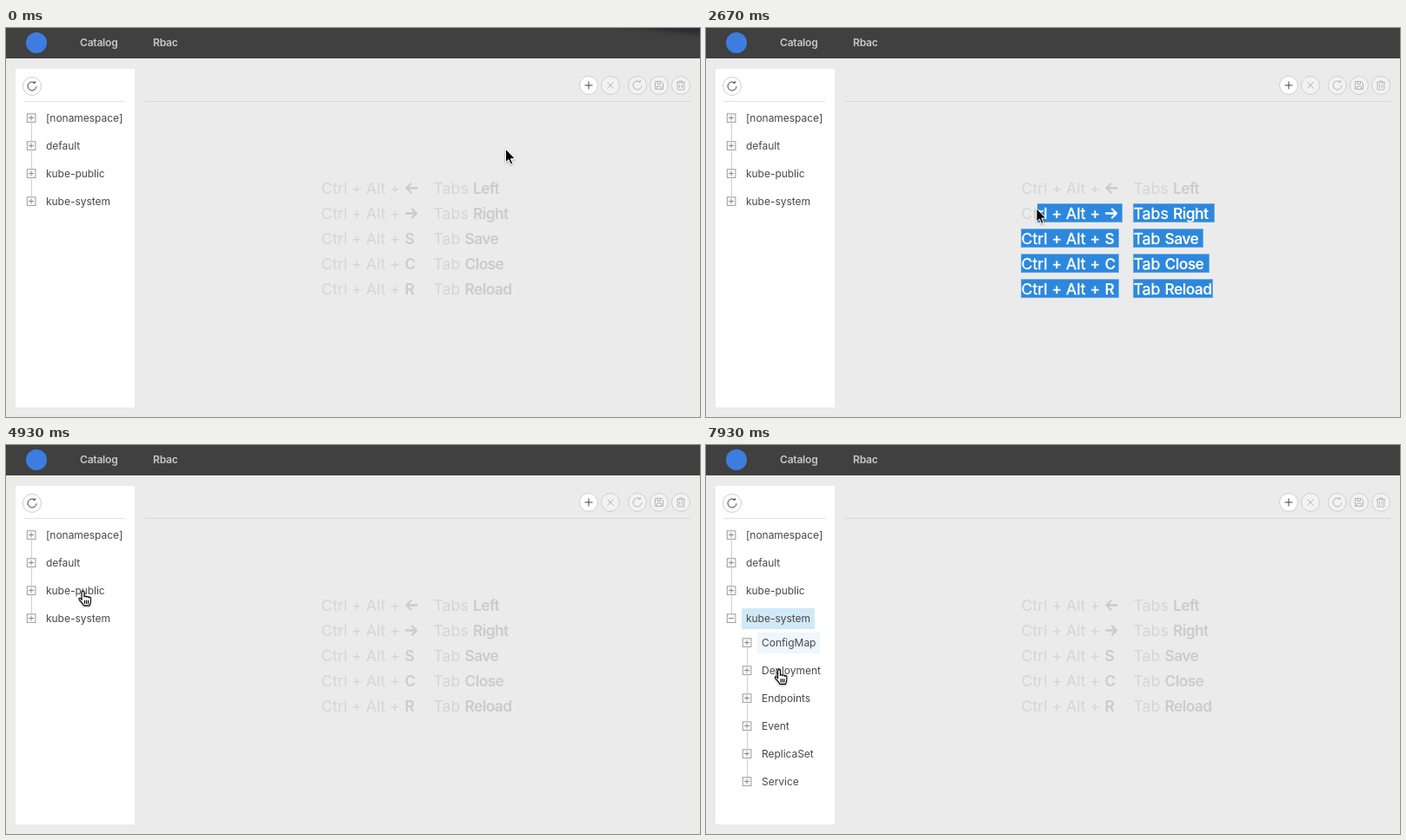
Recreate the animation shown at these times as an HTML page. Size 798 by 448 pixels, loop 8000 ms.

```html
<!DOCTYPE html>
<html lang="en">
<head>
<meta charset="utf-8">
<title>Cluster browser</title>
<style>
html, body { margin: 0; width: 100%; height: 100%; overflow: hidden; background: #ebebeb; }
svg { display: block; width: 100vw; height: 100vh; }
text { font: 12px Inter, sans-serif; font-optical-sizing: none; letter-spacing: -.2px; white-space: pre; }
.nav text { font-weight: 600; fill: #c9c9c9; }
.tree text { fill: #484848; letter-spacing: -.03px; }
.keys text { font-size: 17.7px; letter-spacing: 0; fill: #d5d5d5; }
.keys .b { font-size: 17.3px; font-weight: 600; letter-spacing: -.55px; fill: #cbcbcb; }
.keys path { fill: none; stroke: #cbcbcb; stroke-width: 2.3; stroke-linecap: round; stroke-linejoin: round; }
.sel text, .sel .b { fill: #fff; }
.sel text:not(.b) { stroke: #fff; stroke-width: .35; }
.sel path { stroke: #fff; }
.sel rect { fill: #2d88dd; stroke: #6aaeea; }
.icon { fill: none; }
.box { fill: #fff; stroke: #999; }
.line { stroke: #cfcfcf; }
.cur path { stroke-linejoin: round; stroke-linecap: round; }
.hand path { fill: #fff; stroke: #000; stroke-width: 1.1; }
</style>
</head>
<body>
<svg id="stage" viewBox="0 0 798 448" preserveAspectRatio="none">
  <defs>
    <clipPath id="selClip"><rect id="selRow" height="29" width="798"/><rect id="selRest" width="798" height="200"/></clipPath>
    <clipPath id="kidClip"><rect id="kidBox" x="11" y="212" width="137"/></clipPath>
    <filter id="soft"><feGaussianBlur stdDeviation="2.5"/></filter>
    <filter id="drop" x="-50%" y="-50%" width="200%" height="200%">
      <feDropShadow dx="0" dy="1" stdDeviation="0.8" flood-opacity=".35"/>
    </filter>
  </defs>
  <rect width="798" height="448" fill="#ebebeb"/>
  <rect width="798" height="35" fill="#404040"/>
  <path id="shade" d="M704 -4H802V8L760 4Z" fill="#2c2c30" filter="url(#soft)"/>
  <circle cx="35" cy="17" r="12" fill="#3e7de0"/>
  <g class="nav"><text x="85" y="21">Catalog</text><text x="169" y="21">Rbac</text></g>
  <rect x="11" y="47" width="137" height="390" fill="#fff"/>
  <path d="M20 84.5H137" stroke="#e2e2e2"/>
  <path d="M160 84.5H787" stroke="#d6d6d6"/>
  <g id="buttons"></g>
  <g id="tree" class="tree"></g>
  <g id="keys" class="keys"></g>
  <g id="sel" class="keys sel" clip-path="url(#selClip)"></g>
  <g id="cursor" class="cur" filter="url(#drop)">
    <path id="arrow" d="M0 0V15.2L3.5 12 5.8 17.4 8.2 16.4 5.9 11.1H10.6Z" stroke="#fff"/>
    <g id="grab" class="hand">
      <path transform="translate(-7.5 -8.5)" d="M3.6 9.6L2.6 4.4a1.2 1.2 0 0 1 2.3-.5L5.8 7 5.7 2.2a1.2 1.2 0 0 1 2.5 0L8.4 6.8 9.3 2.4a1.2 1.2 0 0 1 2.4.4L11.2 7.4 12.6 4.6a1.2 1.2 0 0 1 2.2.8Q13.8 9 13.6 12.5L12.4 16.6H5.8Q4.6 13.8 .9 10.6 .3 9.2 1.6 8.8T3.6 9.6Z"/>
    </g>
    <g id="point" class="hand" transform="translate(-5.4 0)">
      <path d="M4 11V2a1.4 1.4 0 0 1 2.8 0V7.4a1.4 1.3 0 0 1 2.7.4a1.3 1.2 0 0 1 2.5.6a1.2 1.2 0 0 1 2.2 1V12.5Q14 15 12.8 17.4H6.4Q5.4 15 1.2 10.8 .3 9.4 1.4 8.8T4 11Z"/>
      <path d="M7.4 11.5V15M9.4 11.5V15M11.4 11.5V15" stroke-width=".8"/>
    </g>
  </g>
</svg>
<script>
const LOOP = 8000;
const $ = id => document.getElementById(id);
const show = (id, on) => $(id).style.display = on ? '' : 'none';
const clamp = v => Math.max(0, Math.min(1, v));
const smooth = v => v * v * (3 - 2 * v);
const ramp = (t, from, to) => smooth(clamp((t - from) / (to - from)));

// Toolbar buttons
const icons = {
  plus: 'M-4.5 0H4.5M0 -4.5V4.5',
  close: 'M-3.5 -3.5L3.5 3.5M3.5 -3.5L-3.5 3.5',
  reload: 'M5 .3A5 5 0 1 1 3 -4M3.8 -5.6L3.3 -3.6L1.1 -3.9',
  save: 'M-4.5 -4.5H2.5L4.5 -2.5V4.5H-4.5ZM-2 -4.5V-1.5H1.5V-4.5M-2.5 4.5V1.2H2.5V4.5',
  trash: 'M-5 -3.2H5M-1.8 -3.2V-5H1.8V-3.2M-3.8 -3.2V5H3.8V-3.2M-1.4 -1V3M1.4 -1V3'
};
const button = (x, y, name, ink, fill) =>
  `<g transform="translate(${x} ${y})"><circle r="10.5" fill="${fill}" stroke="#cfcfcf"/>
   <path class="icon" d="${icons[name]}" stroke="${ink}"/></g>`;
$('buttons').innerHTML = button(30, 67, 'reload', '#444', '#fff') +
  button(670, 66, 'plus', '#444', '#fff') +
  [[695, 'close'], [726, 'reload'], [751, 'save'], [776, 'trash']]
    .map(([x, name]) => button(x, 66, name, '#b4b4b4', '#f2f2f2')).join('');

// Namespace tree
const node = (x, y, label, id = '') =>
  `<rect class="box" x="${x - 4.7}" y="${y - 4.7}" width="9.6" height="9.6"/>
   <path d="M${x - 3} ${y}H${x + 3}" stroke="#888"/>
   <path ${id} d="M${x} ${y - 3}V${y + 3}" stroke="#888"/>
   <text x="${x + 17}" y="${y + 4}">${label}</text>`;
const branch = (x, y, labels, lastId) => labels.map((label, i) => {
  const cy = y + 32 * i, last = i === labels.length - 1;
  return node(x, cy, label, last ? lastId : '') +
    (last ? '' : `<path class="line" d="M${x + .5} ${cy + 6}V${cy + 27}"/>`);
}).join('');
$('tree').innerHTML =
  '<rect id="pick" x="41" y="188" width="84" height="24" rx="1"/>' +
  branch(29, 103.5, ['[nonamespace]', 'default', 'kube-public', 'kube-system'], 'id="stem"') +
  '<g id="kids" clip-path="url(#kidClip)"><rect id="hover" x="59" y="216" width="72" height="24" rx="1" fill="#ecf6fd"/>' +
  branch(47, 227.5, ['ConfigMap', 'Deployment', 'Endpoints', 'Event', 'ReplicaSet', 'Service']) + '</g>';

// Shortcut table: key, word, action, action x, right edges of both cells
const rows = [
  ['left', 'Tabs', 'Left', 537, 478.5, 573.5],
  ['right', 'Tabs', 'Right', 537, 478.5, 584.5],
  ['S', 'Tab', 'Save', 527.5, 474.5, 571.5],
  ['C', 'Tab', 'Close', 527.5, 474.5, 578.5],
  ['R', 'Tab', 'Reload', 527.5, 474.5, 582.5]
];
const arrows = { left: 'M472.5 0H460.5M465.5 -5L460.5 0L465.5 5', right: 'M460 0H472M467 -5L472 0L467 5' };
const block = (x, end, y) => `<rect x="${x}" y="${y}" width="${end - x}" height="21"/>`;
const shortcuts = selected => rows.map(([key, word, act, ax, e1, e2], i) => {
  const y = 184.5 + 29 * i, base = y + 6.2, top = y - 11;
  return (selected ? block(362.5, e1, top) + block(491.5, e2, top) : '') +
    `<text x="362.5" y="${base}">Ctrl + Alt +</text>` +
    (arrows[key] ? `<path transform="translate(0 ${y})" d="${arrows[key]}"/>`
      : `<text class="b" x="458.5" y="${base}">${key}</text>`) +
    `<text x="491.5" y="${base}">${word}</text><text class="b" x="${ax}" y="${base}">${act}</text>`;
}).join('');
$('keys').innerHTML = shortcuts(false);
$('sel').innerHTML = shortcuts(true);

// Pointer path: time, x, y
const path = [
  [70, 574.5, 139.5], [930, 598, 270], [1260, 588.5, 302.5], [1600, 588.5, 302.5],
  [1800, 586, 301], [2000, 586, 301], [2670, 380, 208], [2870, 373, 192],
  [3400, 391, 153], [3670, 395.5, 149.5], [4400, 395.5, 149.5], [4930, 88.5, 167.5],
  [5200, 72, 203], [5600, 72, 203], [5930, 67, 202], [6400, 67, 202],
  [7100, 78, 230], [7600, 82, 236], [7930, 84, 258]
];
function pointer(t) {
  const i = path.findIndex(p => p[0] > t);
  if (i === 0) return path[0].slice(1);
  if (i < 0) return path[path.length - 1].slice(1);
  const [a, ax, ay] = path[i - 1], [b, bx, by] = path[i];
  const k = ramp(t, a, b);
  return [ax + (bx - ax) * k, ay + (by - ay) * k];
}

function render(t) {
  const [x, y] = pointer(t);
  $('cursor').setAttribute('transform', `translate(${x} ${y})`);
  const grab = t >= 1200 && t < 2000, point = t >= 4800;
  show('grab', grab);
  show('point', point);
  show('arrow', !grab && !point);
  show('shade', t < 70);

  // Everything from the pointer to the end of the table is selected
  const dragged = t >= 2000 && t < 3800;
  show('sel', dragged);
  if (dragged) {
    const row = Math.floor((y - 170) / 29), top = 170 + 29 * row;
    $('selRow').setAttribute('x', x + 1);
    $('selRow').setAttribute('y', top);
    $('selRest').setAttribute('y', top + 29);
  }

  const open = t >= 5800;
  show('stem', !open);
  $('pick').setAttribute('fill', open ? '#d0e9f9' : '#ecf6fd');
  $('pick').style.opacity = open ? 1 : ramp(t, 5060, 5260);
  show('kids', t >= 7100);
  $('kidBox').setAttribute('height', 195 * ramp(t, 7100, 7400));
  $('hover').style.opacity = ramp(t, 7200, 7400) * (1 - .3 * ramp(t, 7870, 8000));
}

const start = performance.now();
function tick() {
  render((performance.now() - start) % LOOP);
  requestAnimationFrame(tick);
}
render(0);
requestAnimationFrame(tick);
</script>
</body>
</html>
```
